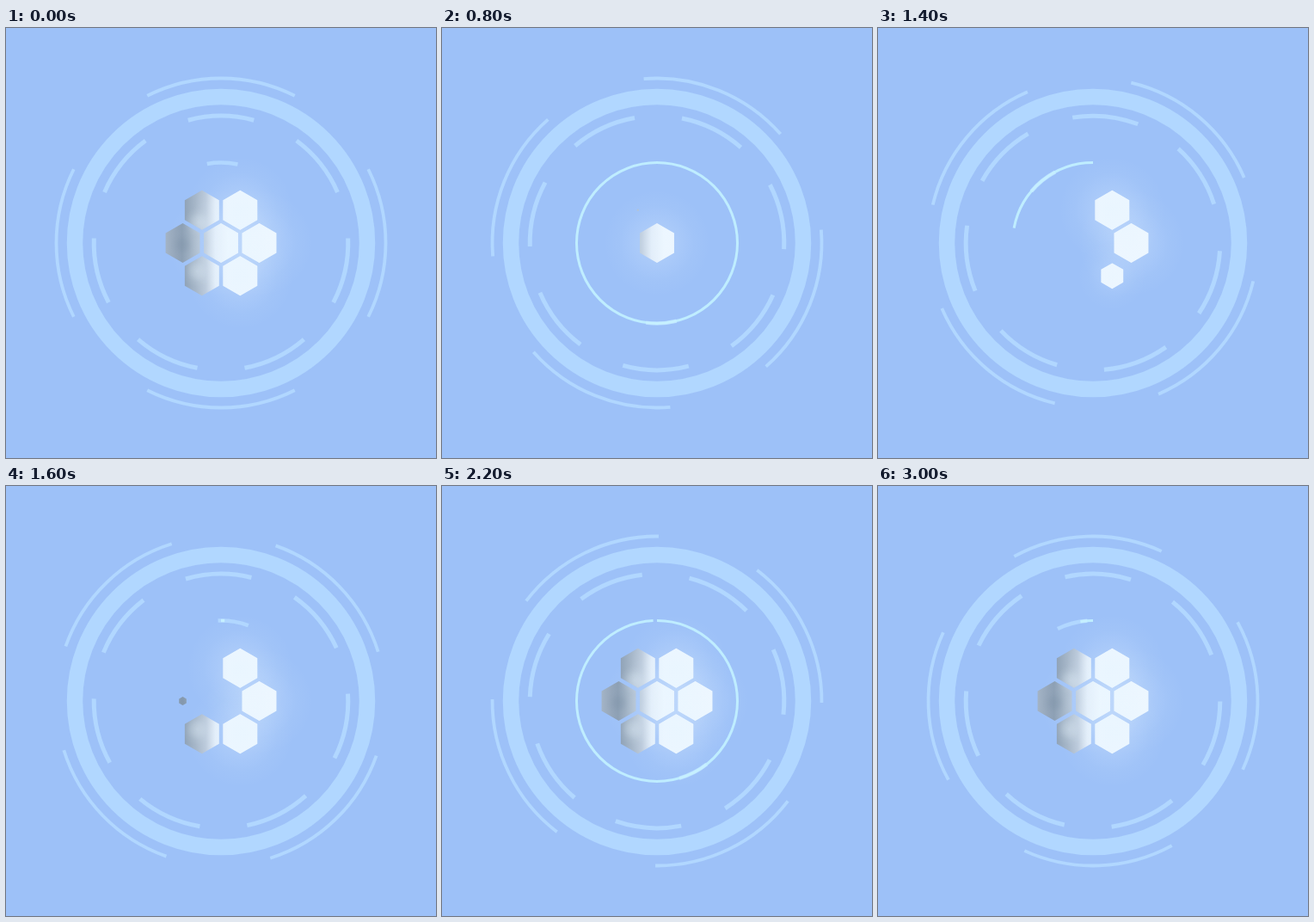
Recreate the animation shown at these times as an HTML page with a canvas. Size 500 px wide and 500 px high, loop 3.1 s.

```html
<!DOCTYPE html>
<html lang="en">
<head>
<meta charset="utf-8">
<title>Hexagon loader</title>
<style>
  html, body { margin: 0; width: 100%; height: 100%; overflow: hidden; background: #9dc1f8; }
  canvas { display: block; width: 500px; height: 500px; }
</style>
</head>
<body>
<canvas id="stage" width="500" height="500"></canvas>
<script>
const ctx = document.getElementById('stage').getContext('2d');
const LOOP = 3100, STEP = 100, C = 250, HEX_R = 23;
const PALE = '#b1d7ff';

// Clockwise from the top right, the middle one last.
const cells = [
  { x: 272.3, y: 211.7, lit: 1, shine: .75 },
  { x: 294.5, y: 250, lit: 1, shine: .3 },
  { x: 272.3, y: 288.3, lit: 1, shine: .75 },
  { x: 227.8, y: 288.3 },
  { x: 205.5, y: 250 },
  { x: 227.8, y: 211.7 },
  { x: 250, y: 250, lit: 1, shine: .35 }
];

const ease = (t, from, to) => {
  const x = Math.min(1, Math.max(0, (t - from) / (to - from)));
  return x * x * (3 - 2 * x);
};

// Angles in degrees, clockwise from twelve o'clock.
function arc(r, from, to, width, color) {
  if (to <= from) return;
  const rad = a => (a - 90) * Math.PI / 180;
  ctx.beginPath();
  ctx.arc(C, C, r, rad(from), rad(to));
  ctx.lineWidth = width;
  ctx.strokeStyle = color;
  ctx.stroke();
}

function dashes(r, count, span, turn, width) {
  for (let i = 0; i < count; i++) {
    const mid = turn + i * 360 / count;
    arc(r, mid - span / 2, mid + span / 2, width, PALE);
  }
}

function addHex({ x, y }, scale) {
  for (let i = 0; i < 6; i++) {
    const a = (i * 60 - 90) * Math.PI / 180;
    const px = x + HEX_R * scale * Math.cos(a), py = y + HEX_R * scale * Math.sin(a);
    i ? ctx.lineTo(px, py) : ctx.moveTo(px, py);
  }
  ctx.closePath();
}

function glow(x, y, r, alpha, rgb = '232,245,255') {
  if (r <= 0 || alpha <= 0) return;
  const g = ctx.createRadialGradient(x, y, 0, x, y, r);
  g.addColorStop(0, `rgba(${rgb},${alpha})`);
  g.addColorStop(.35, `rgba(${rgb},${alpha * .7})`);
  g.addColorStop(.7, `rgba(${rgb},${alpha * .2})`);
  g.addColorStop(1, `rgba(${rgb},0)`);
  ctx.fillStyle = g;
  ctx.fillRect(x - r, y - r, 2 * r, 2 * r);
}

const metal = ctx.createLinearGradient(186, 0, 258, 0);
[[0, '#a3b3c5'], [.26, '#8b9eb3'], [.45, '#a3b4c6'], [.64, '#b7c6d8'], [.8, '#e0ebf8'], [1, '#eef7ff']]
  .forEach(([at, color]) => metal.addColorStop(at, color));

function scaleOf(i, t) {
  const out = i < 6 ? i * 118 : 750;
  const back = 983 + i * 125;
  return t < 950 ? 1 - ease(t, out, out + 167) : ease(t, back, back + 167);
}

function drawCells(t) {
  const items = cells.map((cell, i) => ({ ...cell, s: scaleOf(i, t) }));
  const shown = items.filter(c => c.s > 0);
  const lit = shown.filter(c => c.lit);

  lit.forEach(c => glow(c.x, c.y, 62 * c.s, .25 * c.s));

  ctx.save();
  ctx.beginPath();
  shown.forEach(c => addHex(c, c.s));
  ctx.clip();
  ctx.fillStyle = metal;
  ctx.fillRect(180, 180, 140, 140);
  glow(224, 226, 17, .35);
  glow(222, 283, 18, .35);
  glow(206, 252, 15, .3, '112,134,156');
  lit.forEach(c => glow(c.x, c.y, 54 * c.s, c.shine * c.s));
  ctx.restore();
}

function drawRing(t) {
  const p = t % 1500;
  const glint = p * .24 + 1;
  arc(93.5, glint - 11, glint + 11, 4.5, PALE);
  arc(93.5, 360 * ease(p, 1000, 1478), 360 * ease(p, 0, 667), 3, '#bfedff');
  ctx.globalAlpha = .35;
  const from = 360 * ease(p, 1000, 1478), to = 360 * ease(p, 0, 667);
  arc(93.5, Math.max(from, glint - 11), Math.min(to, glint + 11), 4, '#d2f4ff');
  ctx.globalAlpha = 1;
}

function draw(now) {
  // The picture advances ten times a second, with a short first step.
  const n = Math.floor(now % LOOP / STEP);
  const t = n ? n * STEP - 67 : 0;

  ctx.fillStyle = '#9dc1f8';
  ctx.fillRect(0, 0, 500, 500);
  arc(170, 0, 360, 18.5, PALE);
  dashes(191.5, 4, 53.2, t * .03, 3.8);
  dashes(147.8, 7, 30, -t * 360 / 7 / 1500, 5);
  drawCells(t);
  drawRing(t);
}

const start = performance.now();
function tick() {
  draw(performance.now() - start);
  requestAnimationFrame(tick);
}
tick();
</script>
</body>
</html>
```
